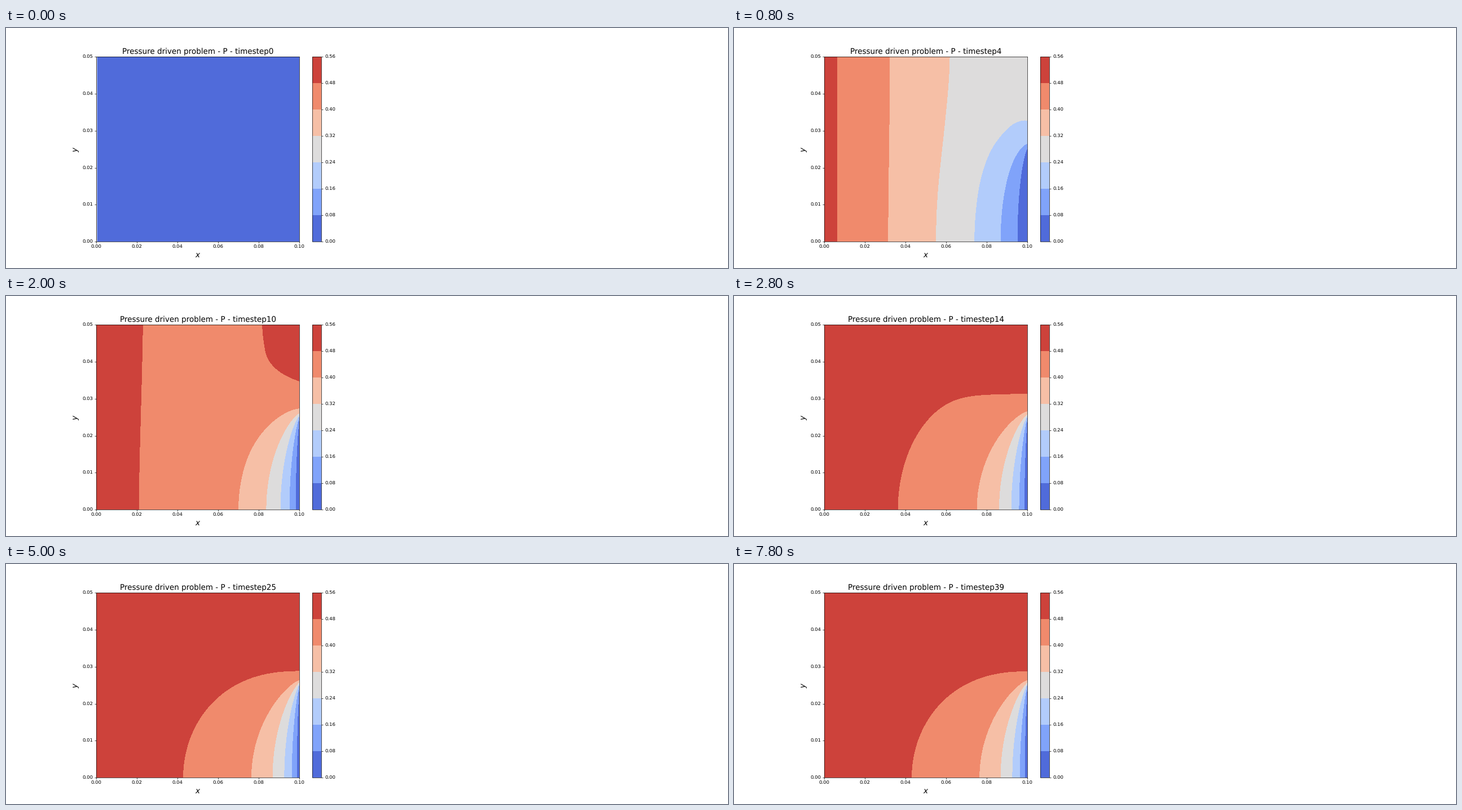
A matplotlib script for the animation above (8000 ms loop, 1280 px wide and 427 px high).

```python
import numpy as np
import matplotlib.pyplot as plt
from matplotlib.animation import FuncAnimation

W, H, DPI = 1280, 427, 61
STEPS = 40
LENGTH, HEIGHT, OUTLET = 0.10, 0.05, 0.025
P_IN = 0.5
TAU = 6.3  # start-up time of the flow, in steps
LEVELS = np.linspace(0, 0.56, 8)

x = np.linspace(0, LENGTH, 161)
y = np.linspace(0, HEIGHT, 201)
X, Y = np.meshgrid(x, y)
D = LENGTH - X  # distance to the outlet plane


def potential_pressure():
    """Pressure at the first instant: potential flow towards a half-open wall."""
    k = np.pi / (2 * HEIGHT)
    phi = np.abs(np.arcsinh(np.sinh(k * (D + 1j * Y)) / np.sin(k * OUTLET)).real)
    return P_IN * phi / phi[:, :1]


def jet_pressure(scale, stretch):
    """Nested bells around the outlet, with pressure saturating outwards."""
    e = np.linspace(0, 7, 300)
    p = P_IN * (1 - np.exp(-e))
    depth = scale * e ** (1 / stretch)
    rise = 0.0247 + 0.0011 * e + 0.03 * (e / 5) ** 9
    power = 0.38 + 0.42 / (1 + (e / 2.3) ** 6)
    rows = [np.interp(LENGTH - x, depth * np.clip(1 - (h / rise) ** 2, 0, 1) ** power, p)
            for h in y]
    return np.array(rows)


def corner_bump():
    """Stagnation pressure in the closed upper corner."""
    low, high = OUTLET - 0.5 * D, 0.036 + 0.4 * D
    g = np.clip((Y - low) / (high - low), 0, 1)
    return np.exp(-(D / 0.033) ** 2) * g * g * (3 - 2 * g)


START = potential_pressure()
YOUNG = jet_pressure(0.0124, 0.866)
STEADY = jet_pressure(0.0130, 0.79)
BUMP = corner_bump()
INLET_LOSS = 0.33 * X * np.exp(-X / 0.025)


def pressure(n):
    p = np.zeros_like(X)
    if n > 0:
        s = 1 / np.cosh(n / TAU) ** 2
        age = np.clip((n - 10) / 7, 0, 1)
        young = YOUNG + 0.005 * (22 - n) * BUMP - INLET_LOSS
        p = s * START + (1 - s) * ((1 - age) * young + age * STEADY)
    p[:, 0] = P_IN
    return np.clip(p, 1e-6, 0.5599)


def contours(n):
    return ax.contourf(X, Y, pressure(n), levels=LEVELS, cmap="coolwarm")


def panel(left, width):
    return fig.add_axes([left / W, 0.11, width / W, 0.77])


plt.rcParams.update({"font.family": "DejaVu Sans", "text.hinting": "none"})
fig = plt.figure(figsize=(W / DPI, H / DPI), dpi=DPI)
ax = panel(160, 360.3)
fig.colorbar(contours(0), cax=panel(543.2, 16.1), ticks=LEVELS, format="%.2f")
ax.set_xlabel("$x$", fontsize=16)
ax.set_ylabel("$y$", fontsize=16)
title = ax.set_title("", fontsize=16)


def update(n):
    for c in list(ax.collections):
        c.remove()
    contours(n)
    ax.set(xlim=(0, LENGTH), ylim=(0, HEIGHT))
    title.set_text(f"Pressure driven problem - P - timestep{n}")
    return []


anim = FuncAnimation(fig, update, frames=STEPS, interval=200, repeat=True,
                     repeat_delay=0, blit=False)
plt.show()
```
